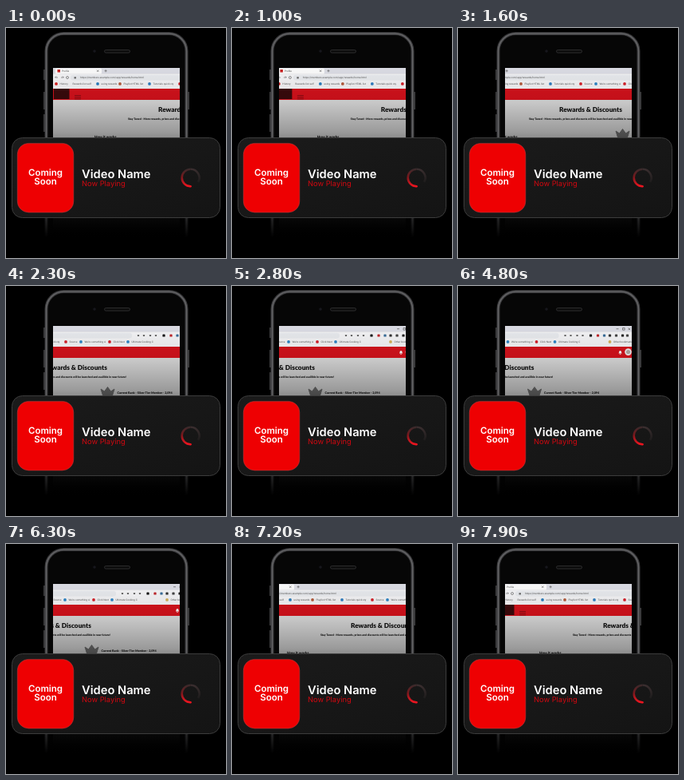
An HTML page that plays this animation: 276 px wide and 288 px high, repeating every 8000 ms.

```html
<!DOCTYPE html>
<html lang="en">
<head>
<meta charset="utf-8">
<title>Video card</title>
<style>
  html, body { margin: 0; width: 100%; height: 100%; overflow: hidden; background: #000; }
  svg { display: block; width: 276px; height: 288px; }
  text { text-rendering: geometricPrecision; }
  #page text { font-family: Lato, "Open Sans", sans-serif; font-weight: 900; fill: #111; }
  #page .ui { font: 400 3.2px Roboto, sans-serif; fill: #555; }
  .card text { font-family: Inter, "Open Sans", sans-serif; font-weight: 600; fill: #fff; }
</style>
</head>
<body>
<svg viewBox="0 0 276 288">
  <defs>
    <clipPath id="screen"><rect x="59" y="50" width="159" height="212"/></clipPath>
    <linearGradient id="shade" gradientUnits="userSpaceOnUse" x1="0" y1="50" x2="0" y2="262">
      <stop offset="0" stop-opacity=".03"/>
      <stop offset=".2" stop-opacity=".1"/>
      <stop offset=".41" stop-opacity=".34"/>
      <stop offset=".88" stop-opacity=".91"/>
      <stop offset="1"/>
    </linearGradient>
    <linearGradient id="fade" gradientUnits="userSpaceOnUse" x1="0" y1="130" x2="0" y2="262">
      <stop offset="0" stop-opacity="0"/>
      <stop offset=".8" stop-opacity=".55"/>
      <stop offset="1"/>
    </linearGradient>
    <linearGradient id="panel" x1="0" y1="0" x2="1" y2="1">
      <stop offset="0" stop-color="#1b1b1b"/>
      <stop offset="1" stop-color="#141414"/>
    </linearGradient>
    <linearGradient id="arc" x1="0" y1="0" x2="0" y2="1">
      <stop offset="0" stop-color="#3a2a2b"/>
      <stop offset=".45" stop-color="#7a181d"/>
      <stop offset="1" stop-color="#ee1520"/>
    </linearGradient>
    <linearGradient id="tail" x1="0" y1="0" x2="0" y2="1">
      <stop offset="0" stop-color="#3a2e2f"/>
      <stop offset="1" stop-color="#1e1c1c"/>
    </linearGradient>
  </defs>

  <rect width="276" height="288"/>

  <!-- phone -->
  <g fill="#3a3a3c">
    <rect x="47" y="52" width="2" height="13"/>
    <rect x="47" y="80" width="2" height="22"/>
    <rect x="47" y="108" width="2" height="22"/>
    <rect x="228" y="80" width="2" height="22"/>
  </g>
  <rect x="50.500" y="7" width="176" height="300" rx="22" fill="#060606" stroke="#39393b" stroke-width="4"/>
  <rect x="50.500" y="7" width="176" height="300" rx="22" fill="none" stroke="#646466" stroke-width="1.600"/>
  <rect x="123.500" y="27.500" width="32" height="3.500" rx="1.750" fill="#0c0c0c" stroke="#353537" stroke-width=".8"/>
  <circle cx="111" cy="29" r="1.800" fill="#17171c"/>

  <g clip-path="url(#screen)">
    <rect x="59" y="50" width="160" height="212" fill="#dedede"/>
    <g id="page"></g>
    <rect x="59" y="50" width="160" height="212" fill="url(#shade)"/>
  </g>
  <rect y="130" width="276" height="158" fill="url(#fade)"/>

  <!-- card -->
  <g class="card">
    <rect x="7.500" y="137.500" width="261" height="100" rx="13" fill="url(#panel)" stroke="#3c3c3c"/>
    <rect x="14.300" y="144.400" width="70.500" height="86.500" rx="14" fill="#ee0002" stroke="#b83a3c" stroke-width=".6"/>
    <g font-size="11.500" text-anchor="middle">
      <text x="49.500" y="185">Coming</text>
      <text x="49.500" y="196">Soon</text>
    </g>
    <text x="95" y="188" font-size="14.700">Video Name</text>
    <text x="95" y="198.300" font-size="9.300" style="fill:#d00810;font-weight:400">Now Playing</text>
    <g fill="none" stroke-width="2.600">
      <path d="M231.500 176.700A10.800 10.800 0 0 1 241 193" stroke="url(#tail)"/>
      <path d="M231.500 176.700A10.800 10.800 0 0 0 231.500 198.300" stroke="url(#arc)"/>
      <circle cx="231.500" cy="198.300" r="1.300" fill="#ee1520"/>
    </g>
  </g>
</svg>
<script>
const page = document.getElementById('page');

function add(tag, attrs, text) {
  const el = document.createElementNS('http://www.w3.org/2000/svg', tag);
  for (const key in attrs) el.setAttribute(key, attrs[key]);
  if (text) el.textContent = text;
  page.append(el);
}
const box = (x, y, width, height, fill, rx = 0) => add('rect', { x, y, width, height, fill, rx });
const dot = (cx, cy, r, fill) => add('circle', { cx, cy, r, fill });
const line = (d, stroke, width = 0.6) => add('path', { d, stroke, fill: 'none', 'stroke-width': width });
const label = (x, y, str) => add('text', { x, y, class: 'ui' }, str);
const bold = (x, y, size, str) => add('text', { x, y, 'font-size': size }, str);

// All x values are measured from the left edge of the page heading.
function buildBrowser() {
  box(-140, 50, 350, 7.5, '#dfe0e8');
  box(-129, 50.5, 58, 7, '#fff', 1.5);
  box(-126.5, 52, 3.5, 3.5, '#c22');
  label(-121, 55.2, 'Profile');
  line('M-77 52.5l2.4 2.4m0-2.4l-2.4 2.4M-67.5 53.7h3.2m-1.6-1.6v3.2', '#555');
  line('M182 53.7h3M190 52.5h2.6v2.6h-2.6zM197 52.5l2.6 2.6m0-2.6l-2.6 2.6', '#444', 0.6);

  box(-140, 57.5, 350, 18.5, '#f8f8fa');
  box(-110, 58.8, 220, 6.7, '#eceef2', 3.3);
  line('M-126 62h-3.5l1.6-1.6M-122 62h3.5l-1.6-1.6', '#555');
  add('circle', { cx: -114, cy: 62, r: 1.5, fill: 'none', stroke: '#555', 'stroke-width': 0.6 });
  box(-105.5, 61.2, 2.4, 2.2, '#666');
  label(-98, 63.2, 'https://members.example.com/app/rewards/home.html');

  const tools = ['#666', '#666', '#666', '#666', '#111', '#c3272b', '#3a6f9c', '#333', '#444', '#222', '#444'];
  const toolX = [118, 125, 133, 140, 150, 159, 167, 174, 182, 190, 196];
  tools.forEach((color, i) => {
    const r = i < 4 ? 1.1 : 1.6;
    box(toolX[i] - r, 62 - r, 2 * r, 2 * r, color, 0.7);
  });

  [
    [-128, '#d22', 'History'],
    [-112, '', 'Rewards list self'],
    [-76, '#2a7fc0', 'using rewards'],
    [-48, '#b65a3a', 'Playlist HTML list'],
    [-11, '#2f7fc4', 'Tutorials quick sty'],
    [27, '#d8202a', 'Source'],
    [46, '#2d86c9', "We're something si"],
    [82, '#d8202a', 'Click Next'],
    [105, '#2d86c9', 'Ultimate Cooking C'],
    [174, '#d9b45a', 'Other bookmarks']
  ].forEach(([x, color, name]) => {
    if (color) dot(x, 69.9, 1.9, color);
    label(x + 4.5, 71.1, name);
  });
}

function buildContent() {
  box(-140, 76, 350, 14, '#d8121c');
  box(-131, 76, 19.5, 13, '#3a0a0c');
  line('M-105 84.5h8M-105 86.7h8M-105 88.9h8', '#7c0a10', 0.8);
  add('path', { d: 'M185 84.5q.5-.8.5-2a1.5 1.5 0 0 1 3 0q0 1.2.5 2zM186.3 85h1.4v.8h-1.4z', fill: '#fff' });
  dot(197, 82.6, 4.3, '#f2f2f2');
  dot(197, 82.6, 2.6, '#b3a9a6');

  bold(0, 105.2, 8.25, 'Rewards & Discounts');
  bold(-38, 115.3, 3.4, 'Stay Tuned - More rewards, prizes and discounts will be launched and availible in near future!');
  bold(-80, 137.5, 4.6, 'How it works');
  add('path', {
    d: 'M71 129l4.5 3 4-5.500 4 5.500 4.500-3-2.500 8h-12z',
    fill: '#707070', stroke: '#707070', 'stroke-linejoin': 'round'
  });
  bold(91.5, 134.5, 3.7, 'Current Rank - Silver Tier Member - 2,094');
}

buildBrowser();
buildContent();

// Pan: [time in ms, x of the heading]
const LOOP = 8000, STEP = 100;
const pan = [
  [0, 191], [400, 191], [700, 189], [900, 189], [1200, 175], [1600, 127],
  [2300, 48], [2800, 25], [3500, 17], [4000, 15], [4400, 15], [4800, 16.5],
  [5300, 17], [5500, 18], [6100, 19], [6300, 28], [6700, 85], [7200, 149],
  [7900, 182], [8000, 185]
];
const rate = i => (pan[i + 1][1] - pan[i][1]) / (pan[i + 1][0] - pan[i][0]);

function slope(i) {
  if (i === 0 || i === pan.length - 1) return 0;
  const a = rate(i - 1), b = rate(i);
  return a * b <= 0 ? 0 : 2 * a * b / (a + b);
}

function panAt(t) {
  let i = 0;
  while (i < pan.length - 2 && t >= pan[i + 1][0]) i++;
  const [t0, x0] = pan[i], [t1, x1] = pan[i + 1];
  const h = t1 - t0, u = (t - t0) / h, v = 1 - u;
  return v * v * (1 + 2 * u) * x0 + u * u * (3 - 2 * u) * x1
    + h * u * v * (v * slope(i) - u * slope(i + 1));
}

function draw(now) {
  const t = Math.floor((now % LOOP) / STEP) * STEP;
  page.setAttribute('transform', `translate(${panAt(t).toFixed(2)} 0)`);
  requestAnimationFrame(draw);
}
draw(performance.now());
</script>
</body>
</html>
```
